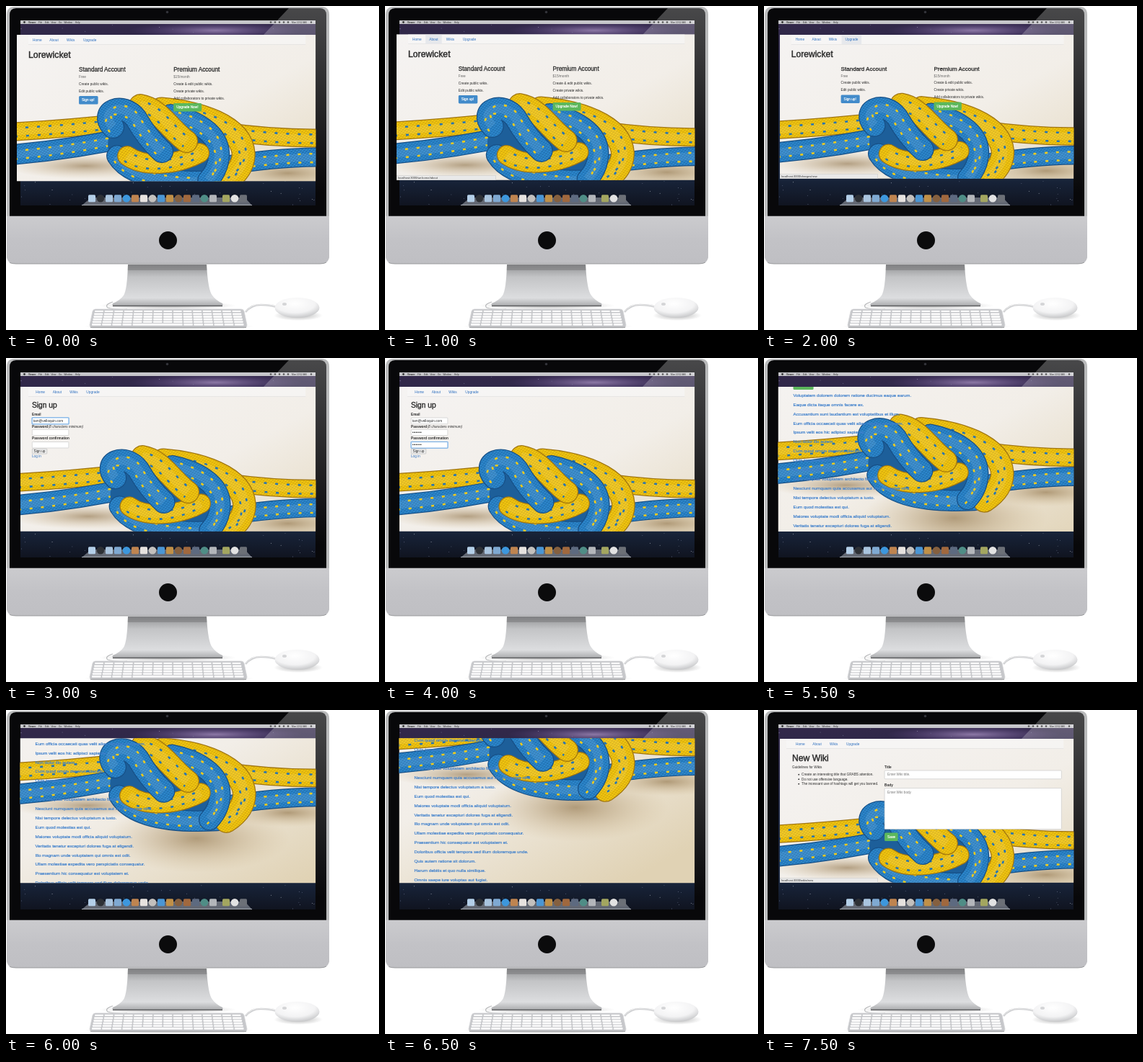
An HTML page for the animation above (8000 ms loop, 517 by 450 pixels).

```html
<!DOCTYPE html>
<html lang="en">
<head>
<meta charset="utf-8">
<title>Wiki tour</title>
<style>
  html, body { margin: 0; width: 100%; height: 100%; overflow: hidden; background: #fff; }
  #stage { display: block; width: 517px; height: 450px; }
  text { font-family: "Liberation Sans", Arial, sans-serif; white-space: pre; }
</style>
</head>
<body>
<svg id="stage" viewBox="0 0 517 450">
  <defs>
    <linearGradient id="chin" x2="0" y2="1">
      <stop offset="0" stop-color="#cbcbce"/><stop offset=".5" stop-color="#c2c2c6"/><stop offset="1" stop-color="#bfbfc3"/>
    </linearGradient>
    <linearGradient id="sky" x2="0" y2="1">
      <stop offset="0" stop-color="#33284a"/><stop offset=".5" stop-color="#1d2742"/><stop offset=".86" stop-color="#18243a"/><stop offset="1" stop-color="#101420"/>
    </linearGradient>
    <radialGradient id="glow">
      <stop offset="0" stop-color="#8d79a6"/><stop offset="1" stop-color="#5a4280" stop-opacity="0"/>
    </radialGradient>
    <linearGradient id="gloss" x2="0" y2="1">
      <stop offset="0" stop-color="#fff" stop-opacity=".26"/><stop offset="1" stop-color="#fff" stop-opacity="0"/>
    </linearGradient>
    <linearGradient id="neck" x2="0" y2="1">
      <stop offset="0" stop-color="#8f9092"/><stop offset=".3" stop-color="#c3c4c6"/><stop offset=".8" stop-color="#dcdddf"/><stop offset="1" stop-color="#a9aaac"/>
    </linearGradient>
    <radialGradient id="shade">
      <stop offset="0" stop-color="#000" stop-opacity=".3"/><stop offset="1" stop-color="#000" stop-opacity="0"/>
    </radialGradient>
    <radialGradient id="mouse" cx=".45" cy=".3" r=".75">
      <stop offset="0" stop-color="#fff"/><stop offset=".6" stop-color="#f3f3f4"/><stop offset="1" stop-color="#bfc0c2"/>
    </radialGradient>
    <linearGradient id="paper" x2=".6" y2="1">
      <stop offset="0" stop-color="#f5f3f2"/><stop offset=".5" stop-color="#f2eee8"/><stop offset="1" stop-color="#e0d2b4"/>
    </linearGradient>
    <radialGradient id="warm">
      <stop offset="0" stop-color="#8a6c40" stop-opacity=".6"/><stop offset="1" stop-color="#c9ae80" stop-opacity="0"/>
    </radialGradient>
    <pattern id="yellow" width="5" height="4" patternUnits="userSpaceOnUse" patternTransform="rotate(-12)">
      <path fill="#f4cb10" d="M0 0H5V4H0Z"/><path stroke="#c9970b" stroke-width=".7" fill="none" d="M0 0L2.5 2L5 0M0 4L2.5 2L5 4"/>
    </pattern>
    <pattern id="blue" width="5" height="4" patternUnits="userSpaceOnUse" patternTransform="rotate(-12)">
      <path fill="#2f8bd0" d="M0 0H5V4H0Z"/><path stroke="#17609f" stroke-width=".7" fill="none" d="M0 0L2.5 2L5 0M0 4L2.5 2L5 4"/>
    </pattern>
  </defs>
  <g id="computer"></g>
  <g id="page"></g>
</svg>
<script>
const byId = id => document.getElementById(id);
const INK = '#2b2b2b', LINK = '#2d6fbf', GREEN = '#5cb85c', BLUE = '#428bca';

const rect = (x, y, w, h, fill, more = '') =>
  `<rect x="${x}" y="${y}" width="${w}" height="${h}" fill="${fill}" ${more}/>`;
const path = (d, fill, more = '') => `<path d="${d}" fill="${fill}" ${more}/>`;
const oval = (x, y, rx, ry, fill) => `<ellipse cx="${x}" cy="${y}" rx="${rx}" ry="${ry}" fill="${fill}"/>`;
// y is the middle of the line
const text = (x, y, s, size = 4.76, fill = INK, more = '') =>
  `<text x="${x}" y="${y + size * .34}" font-size="${size}" fill="${fill}" ${more}>${s.replace(/&/g, '&amp;')}</text>`;
const medium = (x, y, s, size, fill = INK) =>
  text(x, y, s, size, fill, `stroke="${fill}" stroke-width="${size * .035}"`);
const bold = (x, y, s, size, fill) => text(x, y, s, size, fill, 'font-weight="700"');
const button = (x, y, w, h, s, fill) =>
  rect(x, y, w, h, fill, 'rx="1.5"') + medium(x + 4, y + h / 2, s, 4.76, '#fff');
const field = (x, y, w, h, s, color = INK, focus = false) =>
  (focus ? rect(x - .8, y - .8, w + 1.6, h + 1.6, '#8fc0f0', 'rx="1"') : '') +
  rect(x, y, w, h, '#fff', `stroke="${focus ? '#4a90d9' : '#c4c4c4'}" stroke-width=".6" rx=".8"`) +
  text(x + (w > 100 ? 4 : 1.5), y + Math.min(h / 2, 6), s, 4.7, color);

function seeded(seed) {
  return () => (seed = seed * 16807 % 2147483647) / 2147483647;
}

function drawComputer() {
  const rnd = seeded(11);
  let s = path('M12 1H437Q448 1 448 12V346Q448 358 436 358H13Q1 358 1 346V12Q1 1 12 1Z', '#b9babb') +
    path('M14 3H435Q444 3 444 13V292H5V13Q5 3 14 3Z', '#08080a') +
    path('M1 291.8H448V346Q448 358 436 358H13Q1 358 1 346Z', 'url(#chin)') +
    path('M5 356.5Q9 358 14 358H435Q441 358 444 356', 'none', 'stroke="#98999b"') +
    oval(223.5, 8.5, 1.8, 1.8, '#33343a') + oval(224.5, 325.5, 12.5, 12.5, '#0b0b0c');

  // desktop
  s += rect(20, 20, 409, 257, 'url(#sky)') + oval(290, 34, 120, 12, 'url(#glow)');
  for (let i = 0; i < 46; i++)
    s += oval(21 + rnd() * 406, i < 8 ? 26 + rnd() * 13 : 243 + rnd() * 33, .45, .45, i % 4 ? '#8791ac' : '#dfe3f0');
  s += rect(20, 20, 409, 5, '#c6c6ca') +
    path('M392 3H435Q444 3 444 13V260H429V40H357Z', 'url(#gloss)') +
    oval(25.5, 22.5, 1.4, 1.4, '#333') + bold(31, 22.5, 'Viewer', 3.2);
  [[45, 'File'], [54, 'Edit'], [62.5, 'View'], [73, 'Go'], [80.5, 'Window'], [96, 'Help'], [396, 'Mon 10:52 AM']]
    .forEach(([x, label]) => s += text(x, 22.5, label, 3.2));
  for (let x = 367; x < 394; x += 6) s += oval(x, 22.5, 1.3, 1.3, '#555');
  s += oval(423, 22.5, 1.2, 1.2, '#555');

  // dock
  s += path('M118 266H331L341 277H105Z', '#737883', 'opacity=".85"') + rect(105, 276, 236, 1, '#a8adb5');
  const icons = ['b4cfe8', '2e3136', 'a9c4de', '7fa9d2', '3d97dd', 'bf8450', 'e6e2df', 'c3c0bd', '4b96d4',
    'c09048', '85603f', 'a0683e', '5d6a80', '4f8d86', 'b3b6ba', 'a3a660', 'e2e2e2', '6c7077'];
  icons.forEach((c, i) => {
    const x = 119 + i * 12 + (i > 14 ? 6 : 0);
    s += i % 3 == 1 ? oval(x, 267.3, 5.3, 5.3, '#' + c) : rect(x - 5, 262.3, 10, 10, '#' + c, 'rx="1.5"');
  });

  // stand
  s += oval(224, 416, 95, 6, 'url(#shade)') +
    path('M169 359H278Q280 395 286 402Q291 409 300 413Q302 417 296 417H152Q146 417 148 413Q158 409 163 402Q168 394 169 359Z', 'url(#neck)') +
    path('M169 359H278L278.4 367H168.7Z', '#6f7072', 'opacity=".45"') +
    path('M148 416.5H300', 'none', 'stroke="#5c5d5f" stroke-width="1.6"') +
    path('M148 411Q136 415 141 419Q150 422 168 421', 'none', 'stroke="#b9babc" stroke-width="1.2"');

  // keyboard
  s += oval(226, 445, 118, 5, 'url(#shade)') +
    path('M124 421H326Q329 421 330 424L334 443Q334 447 330 447H120Q116 447 116 443L120 424Q121 421 124 421Z', '#c6c7ca', 'stroke="#d8d9db" stroke-width=".8"') +
    path('M117 446.3H333', 'none', 'stroke="#a5a6a8" stroke-width="1.2"');
  for (let row = 0; row < 6; row++) {
    const left = 123 - row * .8, step = (327 + row * .8 - left) / 15;
    for (let k = 0; k < 15; k++) {
      if (row == 5 && k > 4 && k < 9) continue;
      const wide = row == 5 && k == 4 ? step * 4 : 0;
      s += rect(left + k * step, 423 + row * 3.6, step - 1.5 + wide, row ? 2.7 : 2.1, '#fcfcfc', 'rx=".8"');
    }
  }

  // mouse
  s += path('M332 425Q340 415 353 415T375 418', 'none', 'stroke="#c6c7c9" stroke-width="2.4"') +
    path('M332 424.6Q340 414.6 353 414.6T375 417.6', 'none', 'stroke="#f2f2f3"') +
    oval(405, 430, 34, 7, 'url(#shade)') + oval(403.5, 419, 31, 14, 'url(#mouse)') + oval(386, 414, 3, 2, '#d4d5d7');
  return s;
}

function rope(color, width, d) {
  const line = (stroke, w, more = '') => path(d, 'none', `stroke="${stroke}" stroke-width="${w}" ${more}`);
  const yellow = color == 'yellow', round = 'stroke-linecap="round"';
  const fleck = yellow ? '#2574b4' : '#f0cb1c';
  return line(yellow ? '#a07510' : '#164f86', width, round) + line(`url(#${color})`, width - 2.5, round) +
    line('#fff', width * .4, 'opacity=".09"') +
    line(fleck, 2.6, 'stroke-dasharray="4 12" transform="translate(-4 7)"') +
    line(fleck, 2.6, 'stroke-dasharray="4 12" stroke-dashoffset="8" transform="translate(3 -5)"');
}

const photo = rect(15, 40, 414, 370, 'url(#paper)') +
  oval(110, 222, 110, 18, 'url(#warm)') + oval(262, 268, 130, 48, 'url(#warm)') + oval(390, 232, 90, 20, 'url(#warm)') +
  rope('yellow', 26, 'M0 175Q80 171 160 162') +
  rope('blue', 29, 'M0 207Q90 200 180 180') +
  rope('yellow', 26, 'M445 183Q380 185 300 174') +
  rope('blue', 27, 'M445 210Q380 209 300 222') +
  oval(225, 192, 84, 48, '#1d5f9a') +
  rope('blue', 30, 'M154 208C170 234 215 247 290 243') +
  rope('yellow', 33, 'M215 143C265 147 326 165 329 205Q329 228 304 244') +
  rope('blue', 30, 'M228 151C262 158 294 176 295 205Q295 226 280 242') +
  rope('yellow', 28, 'M168 208C190 224 235 222 268 204') +
  rope('yellow', 32, 'M186 138C212 142 226 170 250 188') +
  rope('blue', 32, 'M148 168C128 146 162 132 180 156Q196 184 216 202');

const TABS = [['Home', 0], ['About', 23.3], ['Wikis', 47], ['Upgrade', 70]];
const nav = (x, hover) =>
  rect(31, 40, 384, 13.4, '#f8f8f8', 'opacity=".6"') + rect(31, 53.2, 384, .5, '#d9d9d9') +
  TABS.map(([name, dx], i) =>
    (i == hover ? rect(x + dx - 5, 40.6, i == 3 ? 28 : 22.5, 12.6, '#e6e8ec') : '') +
    text(x + dx, 47, name, 4.76, LINK)).join('');

const home = hover => nav(37, hover) + medium(31, 67.8, 'Lorewicket', 12.3) +
  medium(101, 88.3, 'Standard Account', 8.2) + text(101, 98, 'Free', 4.76, '#666') +
  text(101, 108, 'Create public wikis.') + text(101, 118, 'Edit public wikis.') +
  button(101, 125, 26.5, 11.5, 'Sign up!', BLUE) +
  medium(232, 88.3, 'Premium Account', 8.2) + text(232, 98, '$15/month', 4.76, '#666') +
  text(232, 108, 'Create & edit public wikis.') + text(232, 118, 'Create private wikis.') +
  text(232, 128, 'Add collaborators to private wikis.') +
  button(232, 135, 39, 11.5, 'Upgrade Now!', GREEN);

// step: 0 empty, 1 address, 2 password, 3 confirmation
const signUp = step => nav(41.3) + medium(36, 66, 'Sign up', 10.2) +
  bold(36, 78, 'Email', 4.7) + field(36.3, 83, 50.5, 8.6, step > 0 ? 'tam@velloquin.com' : '', INK, step < 2) +
  bold(36, 95, 'Password', 4.7) + text(58.8, 95, '(8 characters minimum)', 4.6, INK, 'font-style="italic"') +
  field(36.3, 99.3, 50.5, 8.2, step > 1 ? '••••••••' : '', INK, step == 2) +
  bold(36, 111.7, 'Password confirmation', 4.7) +
  field(36.3, 116.5, 50.5, 8.4, step > 2 ? '••••••••' : '', INK, step == 3) +
  rect(36.3, 126, 20.5, 7, '#ececec', 'stroke="#aaa" stroke-width=".5" rx=".8"') +
  text(38.5, 129.3, 'Sign up', 4.7) + text(36, 136.8, 'Log in', 4.7, LINK);

const TITLES = `Voluptatem dolorem dolorem ratione ducimus eaque earum.
Eaque dicta itaque omnis facere ex.
Accusantium sunt laudantium est voluptatibus et illum.
Eum officia occaecati quas velit alias repellat nonumem.
Ipsum velit eos hic adipisci sapiente.
Non dolor illo autem.
Cum quod omnis deserunt placeat.
Quia tempora aut modi.
Sint rerum nihil aperiam.
Nam voluptas voluptatem architecto facilis.
Nesciunt numquam quia accusamus aut minus beatae nihil.
Nisi tempore delectus voluptatum a iusto.
Eum quod molestias est qui.
Maiores voluptate modi officia aliquid voluptatum.
Veritatis tenetur excepturi dolores fuga at eligendi.
Illo magnam unde voluptatem qui omnis est odit.
Ullam molestiae expedita vero perspiciatis consequatur.
Praesentium hic consequatur est voluptatem et.
Doloribus officia velit tempora sed illum doloremque unde.
Quis autem ratione sit dolorum.
Harum debitis et quo nulla similique.
Omnis saepe iure voluptas aut fugiat.
Tenetur rerum quaerat est vitae.`.split('\n');

const wikis = () => nav(41.3) + medium(41, 67.2, 'Wikis', 12.3) + button(41, 76, 28, 11.5, 'New Wiki', GREEN) +
  TITLES.map((t, i) => medium(41, 95.2 + i * 12.88, t, 6.15, '#4080cc')).join('');

const RULES = ['Create an interesting title that GRABS attention.', 'Do not use offensive language.',
  'The incessant use of hashtags will get you banned.'];
const newWiki = () => nav(44) + medium(39, 67, 'New Wiki', 12.2) + text(39, 79, 'Guidelines for Wikis', 4.7) +
  RULES.map((r, i) => oval(48.2, 89.6 + i * 6.5, .9, .9, INK) + text(52, 89.5 + i * 6.5, r, 4.7)).join('') +
  bold(167, 79, 'Title', 4.7) + field(167, 84, 245, 11.7, 'Enter Wiki title.', '#777') +
  bold(167, 104, 'Body', 4.7) + field(167, 108.5, 245, 57, 'Enter Wiki body', '#777') +
  button(167, 170.5, 18.5, 11.5, 'Save', GREEN);

const HOST = 'localhost:3000';
const WIN = { x: 15, y: 40, w: 414, h: 203 };
// left and top: window corner; base: left edge the content was laid out for
const SCENES = [
  { left: 15, draw: () => home() },
  { left: 15.5, draw: () => home(0), link: '' },
  { left: 16, top: 39.2, draw: () => home(1), link: '/welcome/about' },
  { left: 19, draw: () => home(2), link: '/wikis' },
  { left: 22, draw: () => home(3), link: '/charges/new' },
  { left: 20, base: 20, draw: () => signUp(0) },
  { left: 20, base: 20, draw: () => signUp(1) },
  { left: 20, base: 20, draw: () => signUp(2) },
  { left: 20, base: 20, draw: () => signUp(3) },
  { left: 20, draw: () => home(2), link: '/wikis' },
  { left: 20, base: 20, draw: wikis },
  { left: 19.5, base: 20, draw: wikis, scroll: 44 },
  { left: 19.5, top: 39.2, base: 20, draw: wikis, scroll: 87.5 },
  { left: 19.5, top: 39.2, base: 20, draw: wikis, scroll: 131 },
  { left: 20, base: 20, draw: wikis, link: '/wikis/new' },
  { left: 22, base: 22, draw: newWiki, link: '/wikis/new' }
];

function drawScene({ left, top = 40, base = 15, scroll = 0, draw, link }) {
  const w = 429.3 - left, zoom = WIN.w / (429 - base);
  const status = link === undefined ? '' :
    rect(15, 236.8, 138, 6.2, '#e9e9e9', 'stroke="#bbb" stroke-width=".4"') + text(17, 239.8, HOST + link, 4.1, '#333');
  return `<svg x="${left}" y="${top}" width="${w}" height="${w / WIN.w * WIN.h}" viewBox="${WIN.x} ${WIN.y} ${WIN.w} ${WIN.h}" preserveAspectRatio="none">
    <g transform="translate(0 ${-scroll})">${photo}
    <g transform="translate(${WIN.x} ${WIN.y}) scale(${zoom}) translate(${-base} ${-WIN.y})">${draw()}</g></g>${status}</svg>`;
}

byId('computer').innerHTML = drawComputer();
const start = performance.now();
let shown = -1;
function tick() {
  const i = Math.floor((performance.now() - start) % 8000 / 500);
  if (i != shown) byId('page').innerHTML = drawScene(SCENES[shown = i]);
  requestAnimationFrame(tick);
}
tick();
</script>
</body>
</html>
```
